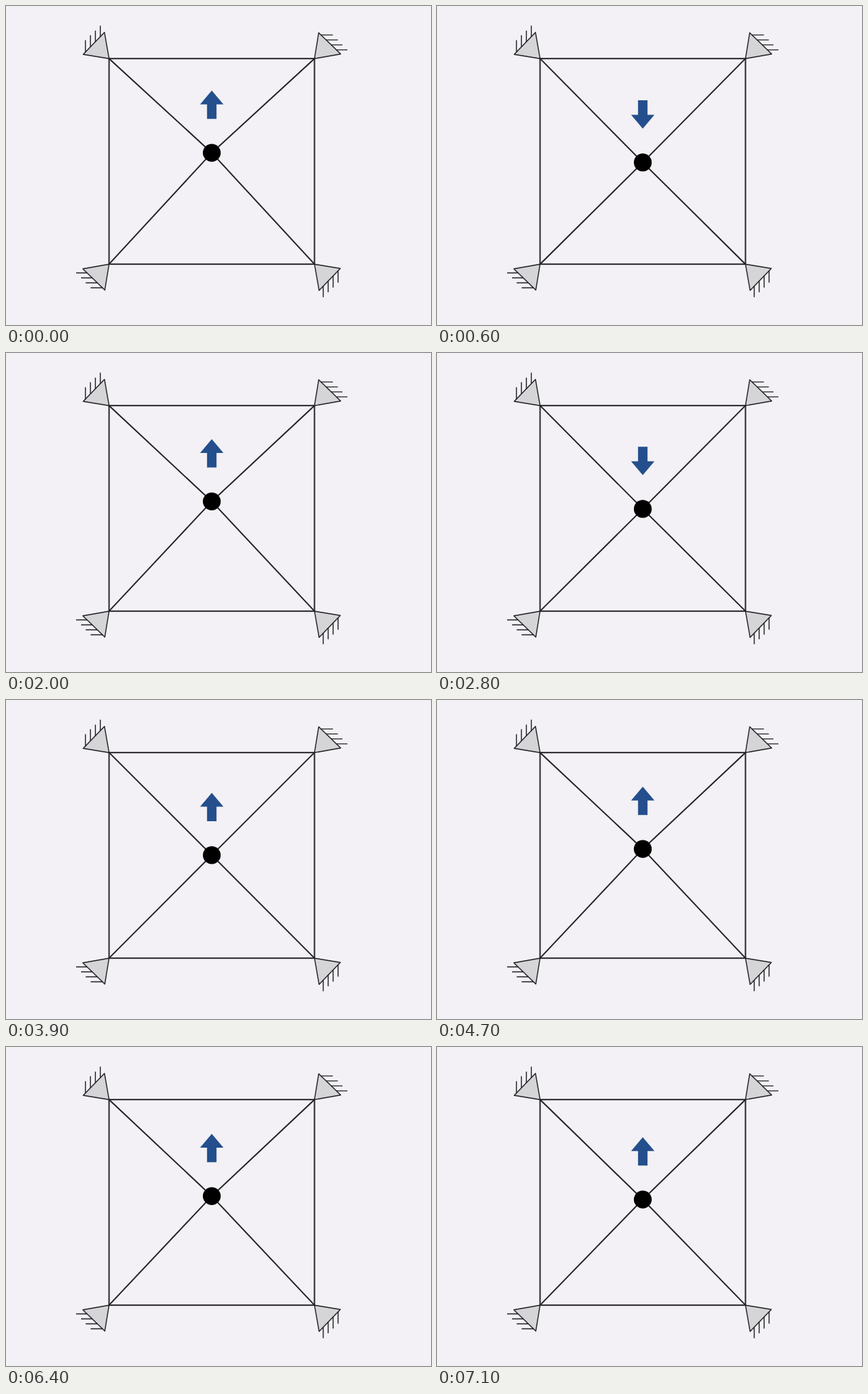
Write an HTML page that moves like this. It is 600 px wide and 450 px high and loops after 7200 ms.

```html
<!DOCTYPE html>
<html lang="en">
<head>
<meta charset="utf-8">
<title>Mass on four cables</title>
<style>
  html, body { margin: 0; height: 100%; overflow: hidden; background: #f3f1f5; }
  svg { display: block; width: 600px; height: 450px; }
</style>
</head>
<body>
<svg viewBox="0 0 600 450" fill="none" stroke="#222226" stroke-width="1.9">
  <defs>
    <g id="support" stroke-width="1.4">
      <path d="M-145-145L-151.5-182L-181.5-151Z" fill="#d5d4d7" stroke-linejoin="round"/>
      <path d="M-178.3-154v-17M-171.3-161.5v-16.5M-164.3-168.5v-16M-157.3-176v-15.5"/>
    </g>
  </defs>
  <g transform="translate(290.5 219.2)">
    <rect x="-145" y="-145" width="290" height="290"/>
    <path id="cables"/>
    <use href="#support"/>
    <use href="#support" transform="rotate(90)"/>
    <use href="#support" transform="rotate(180)"/>
    <use href="#support" transform="rotate(270)"/>
    <circle id="mass" r="12.6" fill="#000" stroke="none"/>
    <path id="arrow" d="M0-20L16.5-.5H6.7V20H-6.7V-.5H-16.5Z" fill="#244f8c" stroke="none"/>
  </g>
</svg>
<script>
const LOOP = 7200, STEP = 100, PERIOD = 2222, AMPLITUDE = 12.1;
const [cables, mass, arrow] = ['cables', 'mass', 'arrow'].map(id => document.getElementById(id));

function draw(now) {
  const t = Math.floor(now % LOOP / STEP) * STEP;
  const y = -AMPLITUDE * Math.cos(2 * Math.PI * t / PERIOD);
  cables.setAttribute('d', `M-145-145L0 ${y}L145-145M-145 145L0 ${y}L145 145`);
  mass.setAttribute('cy', y);
  // The arrow points along the displacement.
  arrow.setAttribute('transform', `translate(0 ${y - 67.8}) scale(1 ${y < 0 ? 1 : -1})`);
}

const start = performance.now();
function tick() {
  draw(performance.now() - start);
  requestAnimationFrame(tick);
}
tick();
</script>
</body>
</html>
```
